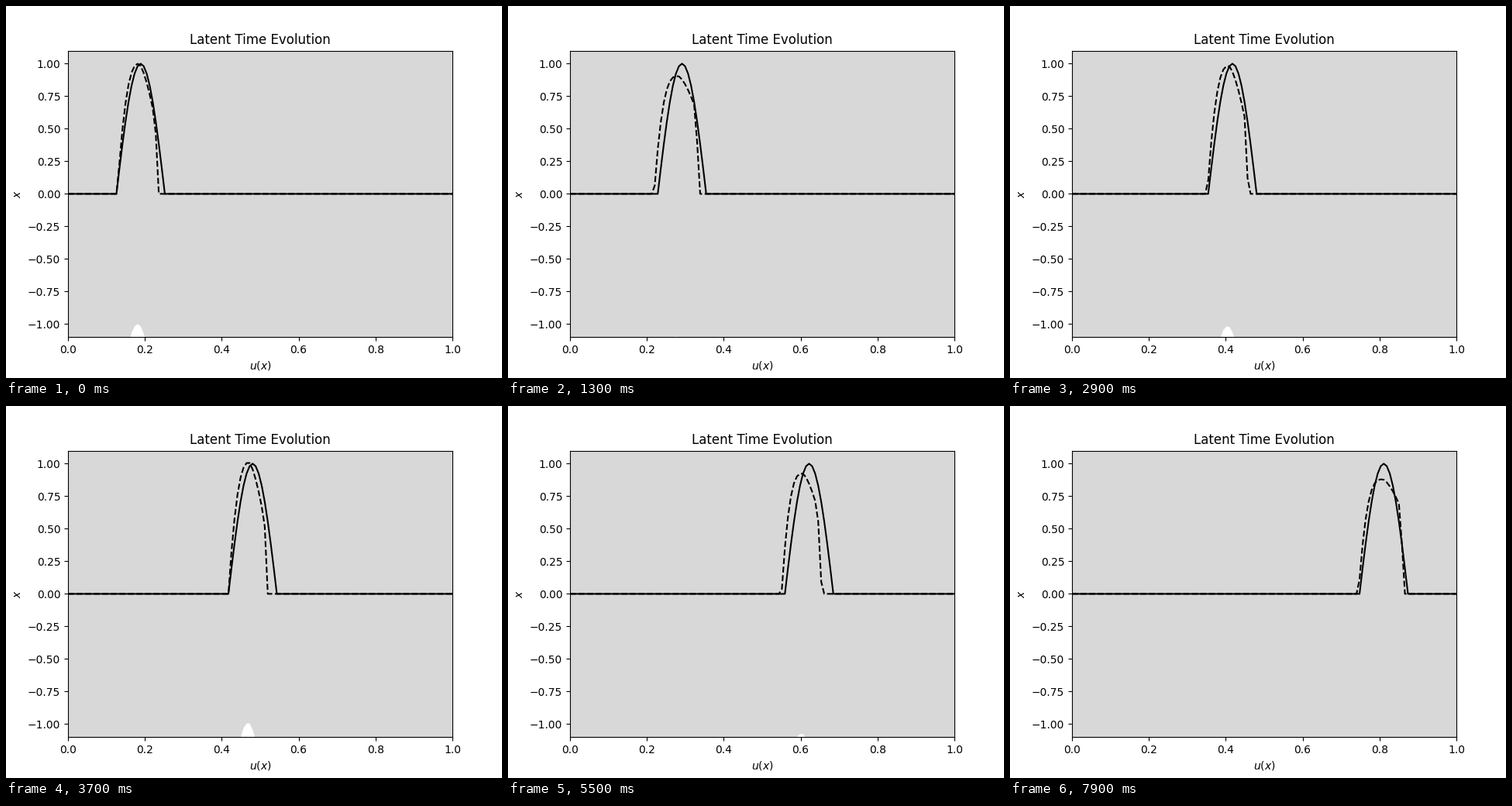
Animation, 640 px wide and 480 px high, one loop 8000 ms. Source, as a matplotlib script:

```python
import numpy as np
import matplotlib.pyplot as plt
from matplotlib.animation import FuncAnimation

N = 128          # grid points
WIDTH = 16       # support of the exact bump, in cells
FRAMES = 80
CREST = .52      # where the approximate bump peaks along its support

x = np.linspace(0, 1, N)
cells = np.arange(N)

# Approximate bump: step, left edge relative to the exact one, width, peak
KEYS = np.array([
    (0, .25, 13.7, 1.0),
    (13, -1.2, 15.2, .905),
    (37, 0, 13, 1.01),
    (49, .1, 12.4, 1.065),
    (55, -1.1, 13.3, .925),
    (66, 0, 16, .86),
    (75, 0, 13, 1.07),
    (79, -.35, 15.35, .88),
])


def pose(step):
    """Left edge, width and peak, eased between the keys."""
    i = min(np.searchsorted(KEYS[:, 0], step, side="right"), len(KEYS) - 1)
    a, b = KEYS[i - 1], KEYS[i]
    t = (step - a[0]) / (b[0] - a[0])
    return (a + (b - a) * (1 - np.cos(np.pi * t)) / 2)[1:]


def exact(step):
    phase = np.clip((cells - WIDTH - step) / WIDTH, 0, 1)
    return np.sin(np.pi * phase)


def approx(step):
    left, width, peak = pose(step)
    s = np.clip((cells - WIDTH - step - left) / width, 0, 1)
    tall = (peak - .86) / .15
    # rounded rise, then a sloping shoulder ended by a steep drop
    rise = 1 - np.clip(1 - s / CREST, 0, 1) ** (3.1 - .7 * tall)
    r = np.clip((s - CREST) / (1 - CREST), 0, 1)
    shoulder = 1 - (.3 + .3 * tall) * r ** 1.5
    return peak * np.minimum(rise, np.minimum(shoulder, 3.2 * (1 - r)))


def band_outline(u, spread=2):
    upper = np.column_stack([x, u + spread])
    lower = np.column_stack([x, u - spread])
    return np.vstack([upper, lower[::-1]])


fig, ax = plt.subplots(figsize=(6.4, 4.8), dpi=100)
band = plt.Polygon(band_outline(approx(0)), facecolor="#d8d8d8", linewidth=0)
ax.add_patch(band)
solid, = ax.plot(x, exact(0), "k-")
dashed, = ax.plot(x, approx(0), "k--")
ax.set(xlim=(0, 1), ylim=(-1.1, 1.1), xlabel="$u(x)$", ylabel="$x$",
       title="Latent Time Evolution")


def update(step):
    u = approx(step)
    solid.set_ydata(exact(step))
    dashed.set_ydata(u)
    band.set_xy(band_outline(u))
    return band, solid, dashed


anim = FuncAnimation(fig, update, frames=FRAMES, interval=100, repeat=True,
                     repeat_delay=0)
plt.show()
```
